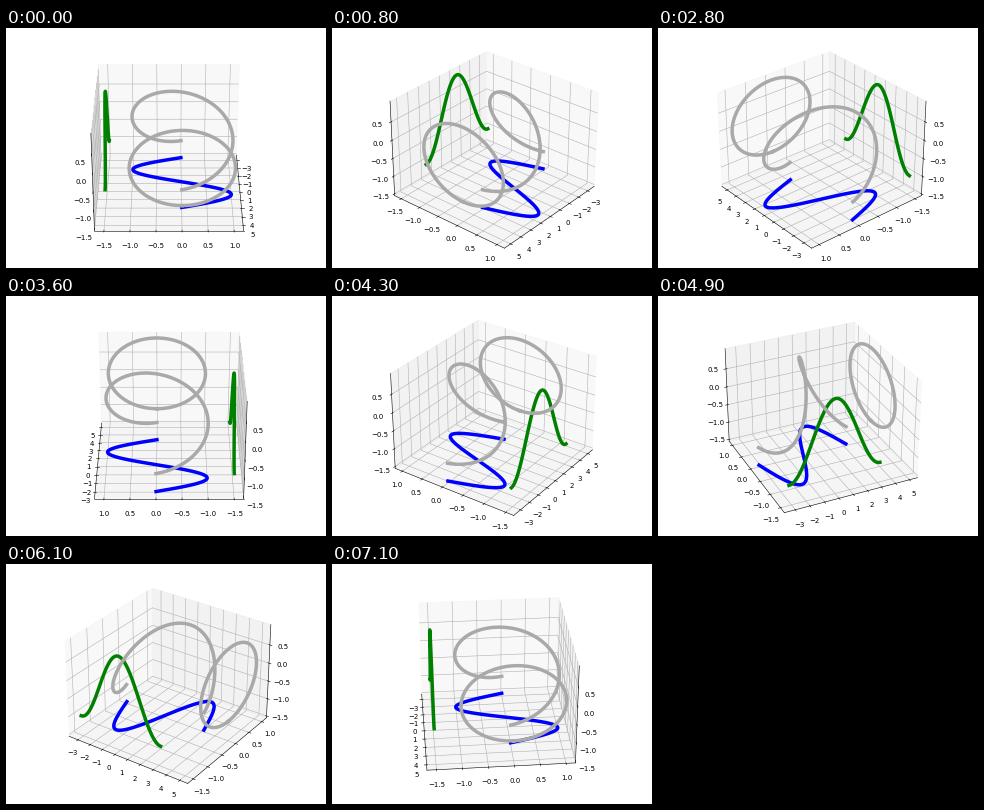
Animation, 320 px wide and 240 px high, one loop 7.2 s. Source, as a matplotlib script:

```python
import numpy as np
import matplotlib.pyplot as plt
from matplotlib.animation import FuncAnimation

WIDTH, HEIGHT, DPI = 320, 240, 50
STEP = 5                      # degrees per frame
FLOOR, WALL, END = -1.5, -1.5, 5
PAD = 7.5                     # pixels around the axes
BORDER = 1 / 48               # gap between data limits and panes


def widen(low, high, share):
    extra = (high - low) * share
    return low - extra, high + extra


x = np.linspace(-np.pi, np.pi, 100)
y, z = np.sin(x), np.cos(x)

fig = plt.figure(figsize=(WIDTH / DPI, HEIGHT / DPI), dpi=DPI)
ax = fig.add_axes(
    [PAD / WIDTH, PAD / HEIGHT, 1 - 2 * PAD / WIDTH, 1 - 2 * PAD / HEIGHT],
    projection="3d",
)

# Shadows on the three planes, then the helix itself
ax.plot(x, y, np.full_like(x, FLOOR), color="blue", lw=5)
ax.plot(x, np.full_like(x, WALL), z, color="green", lw=5)
ax.plot(np.full_like(x, END), y, z, color="darkgray", lw=5)
ax.plot(x, y, z, color="darkgray", lw=5)

ax.set_xlim(*widen(*widen(x.min(), END, 0.05), BORDER))
ax.set_ylim(*widen(*widen(WALL, y.max(), 0.05), BORDER))
ax.set_zlim(*widen(FLOOR, z.max(), BORDER))
ax.set_xticks(np.arange(-3, 6))
ax.set_yticks(np.arange(-1.5, 1.1, 0.5))
ax.set_zticks(np.arange(-1.5, 0.6, 0.5))


def rotate(frame):
    ax.view_init(elev=30, azim=frame * STEP)
    return ax.lines


anim = FuncAnimation(fig, rotate, frames=360 // STEP, interval=100,
                     repeat=True, repeat_delay=0, blit=False)
plt.show()
```
